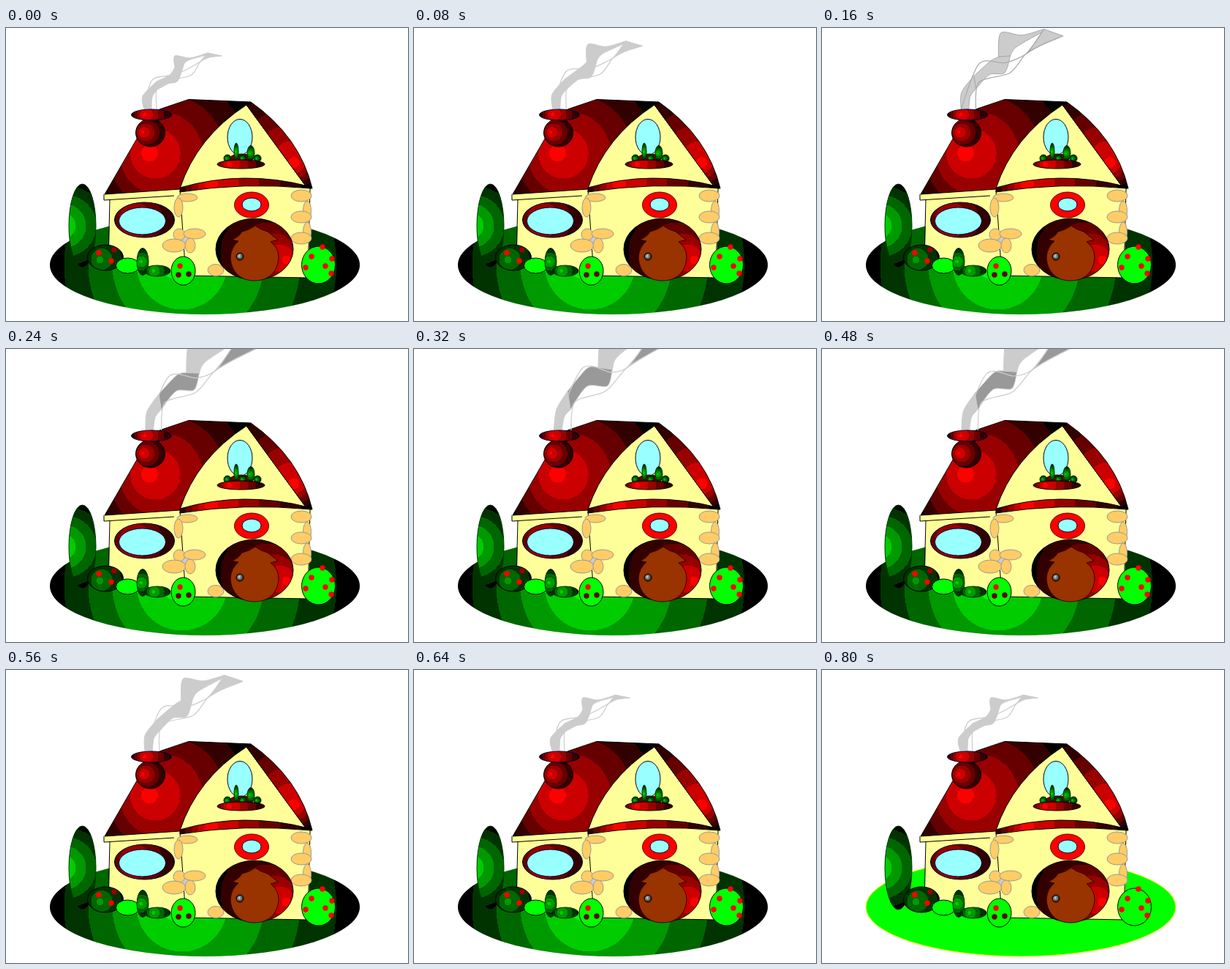
Recreate the animation shown at these times as an HTML page with a canvas. Size 550 px wide and 400 px high, loop 880 ms.

```html
<!DOCTYPE html>
<html lang="en">
<head>
<meta charset="utf-8">
<title>Cottage</title>
<style>
html, body { margin: 0; width: 100%; height: 100%; overflow: hidden; background: #fff; }
canvas { display: block; }
</style>
</head>
<body>
<canvas id="stage" width="550" height="400"></canvas>
<script>
const ctx = document.getElementById('stage').getContext('2d');
const LOOP = 880, STEP = 80;
const CREAM = '#ff9', GLASS = '#9ff', NAVY = '#003', LIME = '#0f0';

const red = v => `rgb(${v},0,0)`;
const green = v => `rgb(0,${v},0)`;
const gray = v => `rgb(${v},${v},${v})`;

// Glow that fades to black from a focus (fx, fy) to a circle, in steps of 51.
function glow(hue, fx, fy, cx, cy, r, top = 255) {
  const g = ctx.createRadialGradient(fx, fy, 0, cx, cy, r);
  let from = 0;
  for (let v = top; v >= 0; v -= 51) {
    const to = Math.min(1, (top - v + 25.5) / top);
    g.addColorStop(from, hue(v));
    g.addColorStop(to, hue(v));
    from = to;
  }
  return g;
}

function paint(path, fill, line, width = 1) {
  if (fill) { ctx.fillStyle = fill; ctx.fill(path); }
  if (line) { ctx.strokeStyle = line; ctx.lineWidth = width; ctx.stroke(path); }
}

function shape(d, fill, line) {
  paint(new Path2D(d), fill, line);
}

function oval(x, y, rx, ry, fill, line) {
  const p = new Path2D();
  p.ellipse(x, y, rx, ry, 0, 0, 7);
  paint(p, fill, line);
}

function ground(flat) {
  if (flat) oval(272, 323.5, 212, 67.5, LIME, '#ff0');
  else oval(272, 323.5, 212, 67.5, glow(green, 228, 322, 270, 323, 207));
}

function walls() {
  shape('M134 227 L238 220 Q325 200 418 219 L413 341 L246 338 L141 314 L142 235 H134Z', CREAM);
  shape('M134 227 V235 L230 229 M142 235 L140 314 M238 222 L246 338 L413 341 L416 219', null, '#000');
}

function roof() {
  shape('M135 227 L182 146 Q196 122 210 111 L250 97.500 L335 101 L329 105 Q261 149 238 220Z',
    glow(red, 192.5, 171, 232, 172, 114), '#000');
  shape('M238 219 Q261 149 329 105 L411 217 Q325 193 238 219Z', CREAM, '#000');
  shape('M329 105 L335 101 Q402 148 419 219 L411 217Z', glow(red, 396, 187, 372, 155, 75), '#000');
  shape('M238 218 Q325 193 414 216 L418 219 Q325 210 238 224Z', glow(red, 276, 213, 325, 213, 92), '#000');
}

function windows() {
  oval(189.5, 262, 41, 24, glow(red, 165, 262, 190, 262, 46), NAVY);
  oval(186.5, 263.5, 32, 18.5, GLASS, NAVY);
  oval(320, 149, 17, 24.5, GLASS, NAVY);
  oval(336, 241.5, 23.5, 17.5, '#f00', '#600');
  oval(336, 241, 13, 9, GLASS, NAVY);
}

function shrub(x, y, rx, ry) {
  const r = Math.max(rx, ry) * 1.05;
  oval(x, y, rx, ry, glow(green, x - rx / 3, y, x, y, r, 204), '#030');
}

function flowerBox() {
  oval(322, 178, 16, 6, '#600', '#300');
  for (const x of [303, 324, 344]) shrub(x, 178, 5, 5);
  shrub(335, 171, 5, 10.5);
  shrub(315, 169, 3, 12);
  oval(321.5, 186, 32.5, 6, glow(red, 304, 186, 321, 186, 37), '#000');
}

function chimney() {
  shape('M186 121 H212 L207 132 H189Z', '#300');
  oval(197.5, 143, 20, 19, glow(red, 186, 142, 196, 143, 24), '#000');
  oval(199, 118.5, 27.5, 7.5, glow(red, 189, 118, 199, 118, 29), NAVY);
}

function door() {
  oval(340, 302, 53, 42, glow(red, 388, 318, 345, 305, 62), '#000');
  shape('M341 270 Q349 276 358 278 Q364 283 372 289 L362 292 Q373 300 373 313 ' +
    'C372 334 358 345 340 345 C322 345 308 334 307 313 Q308 299 318 291 L309 289 Q318 286 323 278 Q333 276 341 270Z',
    '#930', '#300');
  oval(320, 312, 5, 5, glow(gray, 319, 311, 320, 312, 6, 204), '#000');
}

function stones() {
  const stone = (x, y, rx, ry) => oval(x, y, rx, ry, '#fc6', '#999');
  oval(245, 289, 7, 6, '#ccc');
  stone(248, 231.5, 14, 5.5);
  stone(236, 245, 6, 13);
  stone(237, 282, 8, 8);
  stone(258, 281, 15, 7);
  stone(230, 297, 16, 9);
  stone(252, 297, 7, 10);
  stone(287, 330.5, 11, 8);
  // Right corner: upright stones first, flat ones over them.
  for (const i of [1, 3, 0, 2, 4]) {
    if (i % 2) stone(412, 235 + i * 14.5, 5.5, 13.5);
    else stone(404, 229 + i * 14.5, 14, 8);
  }
}

function berries(fill, ...spots) {
  for (const [x, y] of spots) oval(x, y, 3.7, 3.7, fill);
}

function bushes() {
  oval(104.5, 270, 18.5, 57, glow(green, 74, 270, 85, 270, 60), '#030');
  oval(136, 313.5, 24.5, 17.5, glow(green, 127, 317, 135, 314, 29, 153), '#000');
  berries('#f00', [127, 307], [144, 318]);
  berries('#900', [148, 303]);
  oval(166.5, 324.5, 16, 10.5, LIME, '#000');
  shrub(187, 319, 8, 18.5);
  shrub(207, 331.5, 18, 7.5);
  oval(242.5, 331.5, 16.5, 19.5, LIME, '#000');
  berries('#f00', [238, 325]);
  berries('#600', [236, 337], [250, 336]);
  oval(427.5, 323.5, 23, 25.5, LIME, '#000');
  berries('#f00', [418, 312], [433, 299], [446, 315], [410, 327], [437, 325], [445, 335]);
}

// Smoke edges and loose strands, each curled up and fully risen.
const LEFT = [
  [189,111, 187,93, 206,73, 224,64, 231,54, 231,38, 252,41, 276,34],
  [192,111, 197,80, 211,54, 240,17, 257,18, 265,-40, 306,-37, 345,-47]
];
const RIGHT = [
  [199,111, 200,94, 207,84, 222,76, 235,72, 244,48, 252,43, 277,36],
  [203,111, 207,92, 216,82, 240,45, 272,45, 278,23, 287,0, 345,-44]
];
const UPPER = [
  [189,111, 200,71, 233,63, 266,46, 271,40, 276,34],
  [192,111, 237,16, 278,24, 297,21, 318,-5, 345,-47]
];
const LOWER = [
  [206,111, 209,76, 252,65, 266,46, 278,40, 295,38],
  [217,111, 223,71, 264,56, 297,21, 330,0, 382,-30]
];

function blend([a, b], p) {
  const pts = [];
  for (let i = 0; i < a.length; i += 2) {
    pts.push([a[i] + (b[i] - a[i]) * p, a[i + 1] + (b[i + 1] - a[i + 1]) * p]);
  }
  return pts;
}

// Adds a smooth run through the points to the path.
function run(path, pts, first = 'moveTo') {
  path[first](...pts[0]);
  for (let i = 0; i < pts.length - 1; i++) {
    const s = pts[i], e = pts[i + 1], o = pts[i - 1] || s, q = pts[i + 2] || e;
    path.bezierCurveTo(
      s[0] + (e[0] - o[0]) / 7, s[1] + (e[1] - o[1]) / 7,
      e[0] - (q[0] - s[0]) / 7, e[1] - (q[1] - s[1]) / 7, ...e);
  }
  return path;
}

function ribbon(a, b, fill, line) {
  const path = run(new Path2D(), a);
  run(path, b.slice().reverse(), 'lineTo');
  path.closePath();
  paint(path, fill, line);
}

function smoke(p) {
  const [left, right, upper, lower] = [LEFT, RIGHT, UPPER, LOWER].map(e => blend(e, p));
  const deep = p > 0.5 ? '#999' : '#ccc';
  const line = p > 0.35 && p < 0.5 ? '#aaa' : '#ccc';
  ribbon(left.slice(0, 3), right.slice(0, 3), '#ccc', line);
  ribbon(left.slice(4), right.slice(5), '#ccc', line);
  ribbon(left.slice(2, 5), right.slice(2, 6), deep, line);
  ribbon(upper.slice(3), lower.slice(3), deep, line);
  for (const strand of [upper, lower]) paint(run(new Path2D(), strand), null, line, 1.2);
}

function draw(step) {
  ctx.fillStyle = '#fff';
  ctx.fillRect(0, 0, 550, 400);
  ground(step === 10);
  walls();
  roof();
  // Rises over five steps, falls back over three, then rests.
  smoke(step <= 5 ? step / 5 : Math.max(0, (8 - step) / 3));
  chimney();
  windows();
  flowerBox();
  stones();
  door();
  bushes();
}

let shown = -1;
const start = performance.now();
function tick() {
  const step = Math.floor((performance.now() - start) % LOOP / STEP);
  if (step !== shown) draw(shown = step);
  requestAnimationFrame(tick);
}
tick();
</script>
</body>
</html>
```
